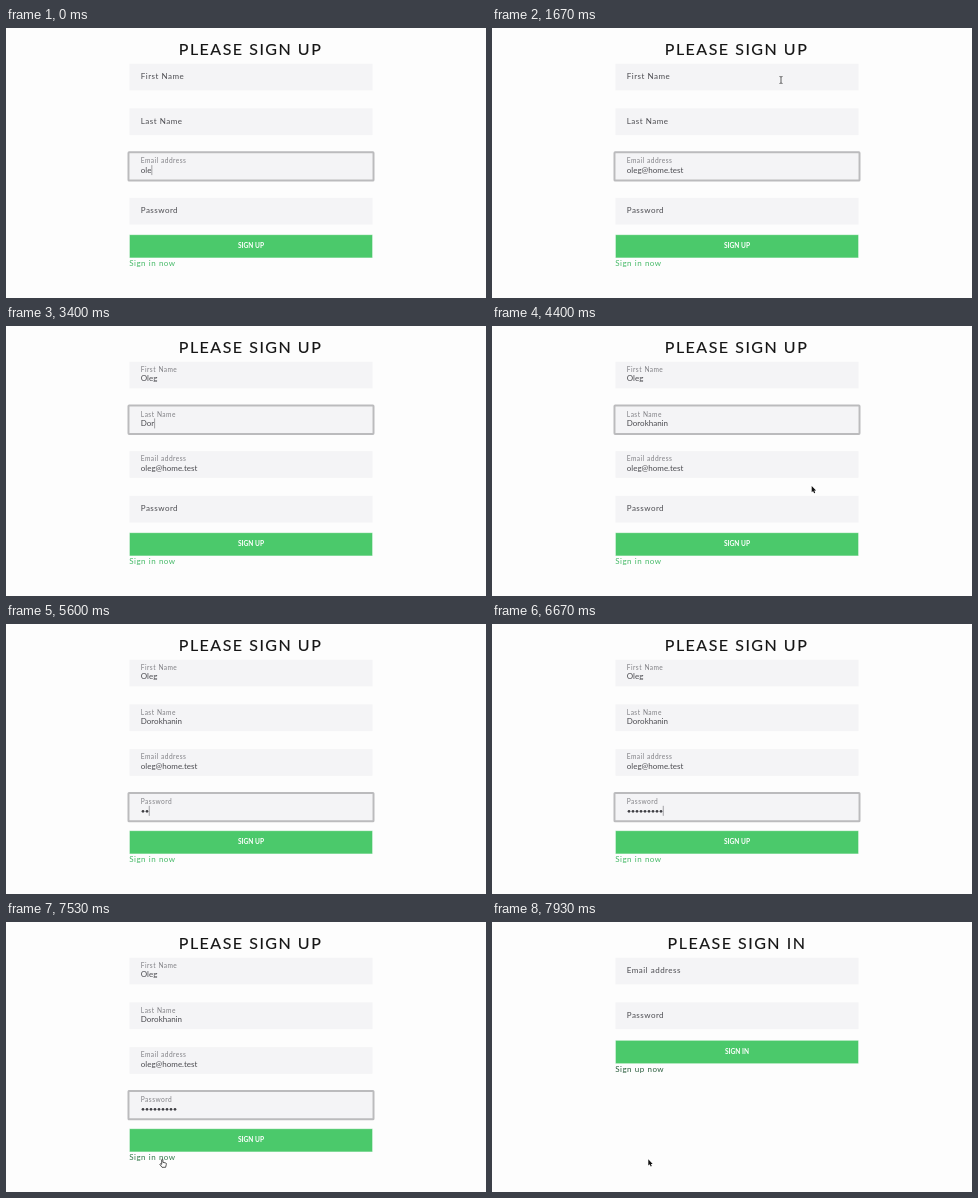
An HTML page for the animation above (8 s loop, 480 by 270 pixels).

```html
<!DOCTYPE html>
<html lang="en">
<head>
<meta charset="utf-8">
<title>Sign up form</title>
<style>
  html, body { margin: 0; width: 100%; height: 100%; overflow: hidden; background: #fdfdfd; }
  svg { display: block; width: 100%; height: 100%; font-family: Lato, "Open Sans", sans-serif; }
  .title { font-size: 16px; letter-spacing: 1.5px; fill: #151515; stroke: #151515; stroke-width: .15px; }
  .label, .link { font-size: 8px; letter-spacing: .46px; word-spacing: .3px; }
  .label { fill: #4b4b50; }
  .label.up { font-size: 6.6px; letter-spacing: .45px; fill: #808085; }
  .value { font-size: 8px; fill: #4b4b50; }
  .dot { fill: #3f3f44; }
  .box { fill: #f4f4f6; }
  .ring { fill: none; stroke: #bbbbbd; stroke-width: 2px; }
  .caret { fill: #8c8c90; }
  .button { fill: #4bc96b; stroke: #4bc96b; stroke-opacity: .4; }
  .action { font-size: 6.6px; font-weight: 700; fill: #fff; text-anchor: middle; }
</style>
</head>
<body>
<svg id="stage" viewBox="0 0 480 270"></svg>
<script>
const LOOP = 8000, PRESS = 7730, SWAP = 7800;
const LEFT = 123.5, WIDTH = 243, HEIGHT = 26.7, PITCH = 44.7, TOP = 35.7;
const stage = document.getElementById('stage');

function make(tag, attrs, parent, text) {
  const node = document.createElementNS('http://www.w3.org/2000/svg', tag);
  for (const key in attrs) node.setAttribute(key, attrs[key]);
  if (text) node.textContent = text;
  parent.appendChild(node);
  return node;
}
const show = (node, on) => node.setAttribute('visibility', on ? 'inherit' : 'hidden');
const within = (t, spans) => spans.some(([a, b]) => t >= a && t < b);
const clamp = v => Math.max(0, Math.min(1, v));
const ease = v => v * v * (3 - 2 * v);

// Each field: label, text, key press times, focus interval
const signUp = [
  { label: 'First Name', text: 'Oleg', keys: [2200, 2330, 2400, 2530], focus: [1770, 2870] },
  { label: 'Last Name', text: 'Dorokhanin',
    keys: [3070, 3200, 3400, 3470, 3530, 3600, 3800, 3870, 3930, 4000], focus: [2870, 4600] },
  { label: 'Email address', text: 'oleg@home.test',
    keys: [0, 0, 0, 70, 330, 470, 530, 670, 730, 870, 1070, 1130, 1200, 1330], focus: [0, 1770] },
  { label: 'Password', secret: true,
    keys: [5400, 5530, 5730, 5870, 6000, 6130, 6270, 6470, 6670], focus: [4600, PRESS] }
];
const signIn = [{ label: 'Email address' }, { label: 'Password' }];
const caretOff = [[1530, 1770], [2000, 2200], [2670, 2870], [4200, 4600], [4870, 5130], [6800, LOOP]];

function makeField(field, i, parent) {
  const y = TOP + i * PITCH;
  make('rect', { class: 'box', x: LEFT, y, width: WIDTH, height: HEIGHT }, parent);
  field.y = y;
  field.name = make('text', { class: 'label', x: 134.8, y: y + 15.5 }, parent, field.label);
  if (!field.keys) return;
  field.ring = make('rect', { class: 'ring', x: LEFT - 1, y: y - .8, width: WIDTH + 2, height: HEIGHT + 1.6, rx: .6 }, parent);
  field.value = make('text', { class: 'value', x: 134.8, y: y + 19.5 }, parent);
  if (field.secret) field.dots = field.keys.map((_, k) =>
    make('circle', { class: 'dot', cx: 137 + 4 * k, cy: y + 17.5, r: 1.35 }, parent));
  field.caret = make('rect', { class: 'caret', y: y + 12, width: .8, height: 10 }, parent);
}

function makePage(fields, title, titleX, action, buttonY, link) {
  const g = make('g', {}, stage);
  make('text', { class: 'title', x: titleX, y: 27.2 }, g, title);
  fields.forEach((field, i) => makeField(field, i, g));
  make('rect', { class: 'button', x: LEFT + .4, y: buttonY + .3, width: WIDTH - .8, height: 22.4 }, g);
  make('text', { class: 'action', x: 245, y: buttonY + 13.6 }, g, action);
  return { g, link: make('text', { class: 'link', x: 123.3, y: buttonY + 31.4 }, g, link) };
}
const upPage = makePage(signUp, 'PLEASE SIGN UP', 172.8, 'SIGN UP', 206.8, 'Sign in now');
const inPage = makePage(signIn, 'PLEASE SIGN IN', 175.6, 'SIGN IN', 118.5, 'Sign up now');

const outline = { fill: '#111', stroke: '#fff', 'stroke-width': .7, 'stroke-linejoin': 'round', 'paint-order': 'stroke' };
const pointers = {
  arrow: make('path', { ...outline, d: 'M0 0V6.2L1.4 5L2.4 7.3L3.5 6.8L2.5 4.6H4.4Z' }, stage),
  beam: make('path', { fill: 'none', stroke: '#222', 'stroke-width': .7, d: 'M-1.5-3.5Q0-3.5 0-2.7Q0-3.5 1.5-3.5M0-2.7V2.7M-1.5 3.5Q0 3.5 0 2.7Q0 3.5 1.5 3.5' }, stage),
  hand: make('path', { fill: '#fff', stroke: '#111', 'stroke-width': .7, 'stroke-linejoin': 'round',
    d: 'M-.6 .4Q0-.4 .6 .4V3L3.6 3.7Q4.3 4 4 5.2L3.3 8H-.3L-2.5 5Q-2.4 3.9-.6 5Z' }, stage)
};

// Pointer trips: time, x, y; hidden between trips while typing
const trips = [
  { end: 2200, path: [[1530, 284, 142], [1670, 289, 52], [1800, 289, 51.5]] },
  { end: 3070, path: [[2670, 289, 51.5], [2870, 284, 97]] },
  { end: 5400, path: [[4200, 284, 97], [4400, 319.7, 160], [4600, 284, 187]] },
  { end: LOOP, path: [[6730, 284, 187], [6930, 292, 234], [7070, 284, 238.5], [7530, 156.3, 237.3]] }
];

function pointAt(t) {
  const trip = trips.find(({ end, path }) => t >= path[0][0] && t < end);
  if (!trip) return null;
  const path = trip.path;
  const next = path.findIndex(p => p[0] > t);
  if (next < 0) return path[path.length - 1].slice(1);
  const a = path[next - 1], b = path[next];
  const k = ease((t - a[0]) / (b[0] - a[0]));
  return [a[1] + (b[1] - a[1]) * k, a[2] + (b[2] - a[2]) * k];
}

function pointerKind([x, y], t) {
  if (t >= SWAP) return 'arrow';
  if (x > LEFT && x < LEFT + WIDTH) {
    if (signUp.some(f => y > f.y && y < f.y + HEIGHT)) return 'beam';
    if (y > 206.8 && y < 229.8) return 'hand';
  }
  return x > 123 && x < 170 && y > 230 && y < 241 ? 'hand' : 'arrow';
}

function drawField(field, t) {
  const count = field.keys.filter(k => t >= k).length;
  const focused = within(t, [field.focus]);
  field.name.setAttribute('class', count ? 'label up' : 'label');
  field.name.setAttribute('y', field.y + (count ? 10.3 : 15.5));
  show(field.ring, focused);
  let end = 134.8;
  if (field.secret) {
    field.dots.forEach((dot, k) => show(dot, k < count));
    end += count * 4;
  } else {
    field.value.textContent = field.text.slice(0, count);
    if (count) end += field.value.getComputedTextLength();
  }
  field.caret.setAttribute('x', end);
  show(field.caret, focused && !within(t, caretOff));
}

function mix(a, b, k) {
  return `rgb(${a.map((v, i) => Math.round(v + (b[i] - v) * k))})`;
}

function draw(t) {
  const swapped = t >= SWAP;
  upPage.g.setAttribute('display', swapped ? 'none' : 'inline');
  inPage.g.setAttribute('display', swapped ? 'inline' : 'none');
  if (!swapped) signUp.forEach(field => drawField(field, t));

  // The link darkens once the pointer rests on it
  const color = mix([70, 186, 104], [43, 94, 62], clamp((t - 7440) / 130));
  for (const { link } of [upPage, inPage]) link.setAttribute('fill', color);

  const point = pointAt(t);
  const kind = point && pointerKind(point, t);
  for (const name in pointers) {
    show(pointers[name], name === kind);
    if (name === kind) pointers[name].setAttribute('transform', `translate(${point})`);
  }
}

function tick() {
  draw(performance.now() % LOOP);
  requestAnimationFrame(tick);
}
tick();
</script>
</body>
</html>
```
